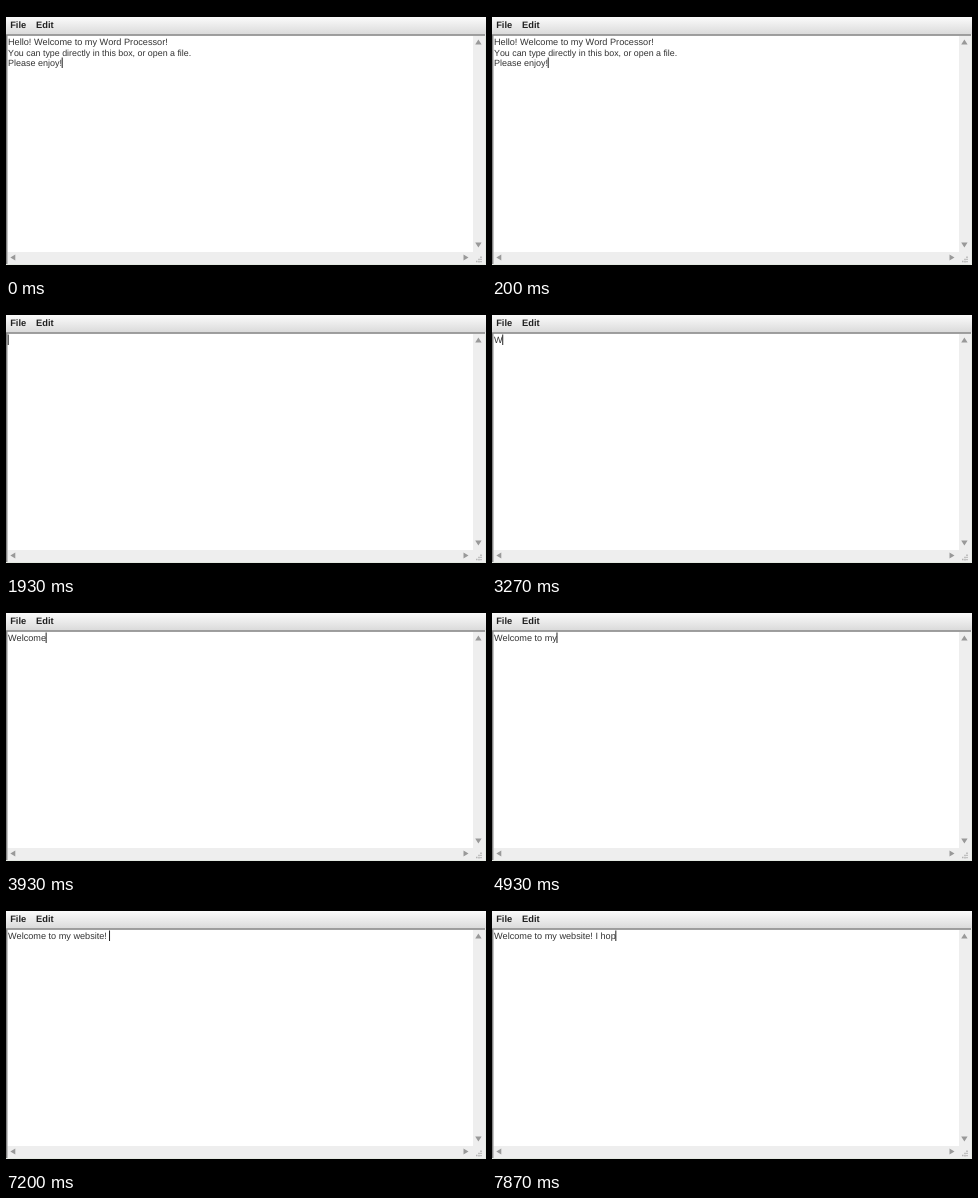
Animation, 480 px wide and 270 px high, one loop 8 s. Source, as an HTML page:

```html
<!DOCTYPE html>
<html lang="en">
<head>
<meta charset="utf-8">
<title>Word processor</title>
<style>
html, body { margin: 0; width: 100%; height: 100%; overflow: hidden; background: #000; }
svg { display: block; width: 480px; height: 270px; }
text { font-family: "Liberation Sans", Arial, sans-serif; font-kerning: none; text-rendering: geometricPrecision; white-space: pre; fill: #333; }
.menu text { font-size: 9.3px; font-weight: bold; fill: #222; }
.selected text { fill: #e9f5ff; }
</style>
</head>
<body>
<svg viewBox="0 0 480 270">
  <defs>
    <linearGradient id="bar" x2="0" y2="1">
      <stop offset="0" stop-color="#fbfbfb"/>
      <stop offset="1" stop-color="#dadada"/>
    </linearGradient>
  </defs>
  <rect width="480" height="270"/>
  <rect y="11" width="480" height="248" fill="#eee"/>
  <rect y="11" width="480" height="17.5" fill="url(#bar)"/>
  <g class="menu"><text x="4.2" y="22.4">File</text><text x="30" y="22.4">Edit</text></g>
  <rect x="1.5" y="30" width="465.5" height="216" fill="#fff"/>
  <path d="M0 29.1H479M.7 29V258" stroke="#858585" stroke-width="1.5"/>
  <path d="M479.5 29V258.5H0" fill="none" stroke="#e4e9e2"/>
  <path d="M469.2 38.5h6.4l-3.2-5zM469.2 236.5h6.4l-3.2 5zM9.3 248.5v6l-5-3zM457.5 248.5v6l5-3z" fill="#999"/>
  <path d="M475 250.5v6M473 252.8v3.7M470.8 254.8v1.7" stroke="#aaa" stroke-width="1.3" stroke-dasharray="1.4 .8"/>
  <g id="intro">
    <path id="mark" d="M1.5 30H167V41H189.5V51.5H56.5V62H1.5z" fill="#0078d7"/>
    <text x="2" y="39" font-size="9.17">Hello! Welcome to my Word Processor!</text>
    <text x="2" y="49.5" font-size="8.87">You can type directly in this box, or open a file.</text>
    <text x="2" y="60" font-size="9">Please enjoy!</text>
  </g>
  <text id="typed" x="2" y="39" font-size="9.13"></text>
  <rect id="caret" width="1" height="10.5" fill="#222"/>
</svg>
<script>
const LOOP = 8000, SELECT = 1400, CLEAR = 1930, BLINK = 2930;
const message = "Welcome to my website! I hop";
// [time in ms, characters typed so far]
const keys = [[3270, 1], [3470, 2], [3530, 3], [3800, 6], [3930, 7], [4270, 8],
  [4470, 11], [4930, 13], [5130, 14], [5670, 15], [6000, 17], [6130, 18], [6330, 20],
  [6670, 21], [7000, 22], [7200, 23], [7330, 24], [7530, 25], [7670, 27], [7870, 28]];
const [intro, mark, typed, caret] = ["intro", "mark", "typed", "caret"].map(id => document.getElementById(id));
const show = (el, on) => el.setAttribute("visibility", on ? "visible" : "hidden");
const start = performance.now();

function draw(now) {
  const t = Math.max(0, now - start) % LOOP;
  const selected = t >= SELECT && t < CLEAR;
  const count = keys.reduce((n, [time, chars]) => t >= time ? chars : n, 0);

  intro.style.display = t < CLEAR ? "" : "none";
  intro.setAttribute("class", selected ? "selected" : "");
  show(mark, selected);

  typed.textContent = message.slice(0, count);
  const end = count ? typed.getComputedTextLength() : 0;
  caret.setAttribute("x", t < CLEAR ? 55.7 : count ? 1.6 + end : 1.7);
  caret.setAttribute("y", t < CLEAR ? 51.5 : 30.5);
  show(caret, !selected && (t < BLINK || count > 0));
  requestAnimationFrame(draw);
}
draw(start);
</script>
</body>
</html>
```
